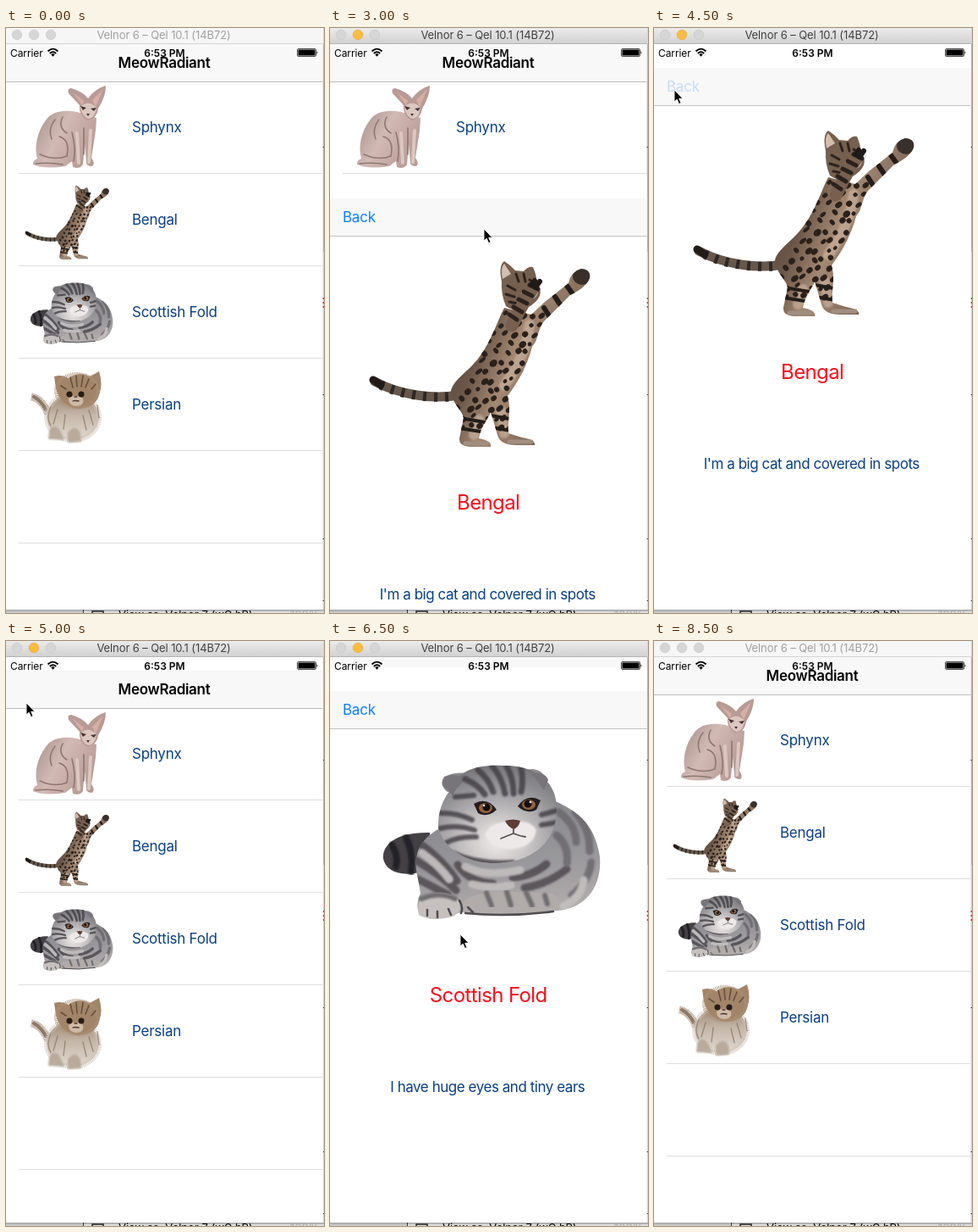
An HTML page for the animation above (8750 ms loop, 376 by 690 pixels).

```html
<!DOCTYPE html>
<html lang="en">
<head>
<meta charset="utf-8">
<title>Cat browser</title>
<style>
html, body { margin: 0; height: 100%; overflow: hidden; background: #fff; }
svg { display: block; width: 376px; height: 690px; font-family: Inter, Roboto, sans-serif; }
.row { font-size: 17px; letter-spacing: -.25px; fill: #0b4080; }
.about { letter-spacing: -.46px; }
.mid { text-anchor: middle; }
.head { font-size: 17px; font-weight: 600; letter-spacing: -.3px; }
.line { fill: none; stroke-linecap: round; stroke-linejoin: round; }
.butt { stroke-linecap: butt; }
</style>
</head>
<body>
<svg viewBox="0 0 376 690">
<defs>
  <linearGradient id="chrome" x2="0" y2="1"><stop stop-color="#ebebeb"/><stop offset="1" stop-color="#d2d2d2"/></linearGradient>
  <linearGradient id="shade" x2="0" y2="1"><stop stop-color="#a4a4a4"/><stop offset="1" stop-color="#d4d4d4"/></linearGradient>
  <linearGradient id="tan" x2="1" y2=".5"><stop stop-color="#4c3d33"/><stop offset=".35" stop-color="#6b5748"/><stop offset=".55" stop-color="#a38872"/><stop offset="1" stop-color="#6f5b4d"/></linearGradient>
  <linearGradient id="grey" x1=".3" x2=".5" y2="1"><stop stop-color="#858488"/><stop offset=".55" stop-color="#98979a"/><stop offset="1" stop-color="#b3aeae"/></linearGradient>
  <radialGradient id="face" cy=".78" r=".8"><stop stop-color="#efebea"/><stop offset=".35" stop-color="#c6c3c4"/><stop offset=".7" stop-color="#969598"/><stop offset="1" stop-color="#747377"/></radialGradient>
  <linearGradient id="pink" x2="1" y2=".5"><stop stop-color="#a28d88"/><stop offset=".5" stop-color="#d2bab4"/><stop offset="1" stop-color="#b79c95"/></linearGradient>
  <linearGradient id="cream" x2="0" y2="1"><stop stop-color="#9b8470"/><stop offset=".45" stop-color="#c4b6a8"/><stop offset="1" stop-color="#e2dad1"/></linearGradient>
  <filter id="soft"><feGaussianBlur stdDeviation="1.3"/></filter>
  <clipPath id="screen"><rect y="19" width="374.5" height="667"/></clipPath>
  <clipPath id="coat"><use href="#torso"/></clipPath>
  <clipPath id="fur"><use href="#trunk"/></clipPath>
  <clipPath id="mask"><use href="#skull"/></clipPath>

  <path id="torso" d="M206 176C197 194 191 214 178 232C166 250 146 260 143 274C144 289 156 296 158 306L153 330Q152 339 165 340H190Q192 333 176 330C178 318 186 308 190 299L198 326Q201 338 220 338H242Q244 332 227 329L211 324C209 311 215 297 210 280C223 263 234 242 239 222C247 213 245 202 253 192L284 161Q303 152 307 141Q309 131 297 130Q285 133 282 147L254 169L238 184Z"/>
  <path id="trunk" d="M132 208C104 222 97 242 104 268L107 286C99 304 103 316 128 315C145 314 149 307 160 308C190 313 240 308 270 306C302 303 322 278 319 242C313 202 290 187 262 175Z"/>
  <path id="skull" d="M143 163C150 141 174 133 205 135C237 134 262 149 267 175C272 208 256 236 223 246C181 258 139 243 128 209Q127 182 143 163Z"/>

  <g id="bengal">
    <path class="line" stroke="#66574c" stroke-width="11" d="M151 279C125 284 85 280 53 263"/>
    <path class="line butt" stroke="#2f2722" stroke-width="11" stroke-dasharray="4 9" d="M140 281C112 283 80 277 58 266"/>
    <path class="line" stroke="#211b18" stroke-width="9" d="M51 261L60 267"/>
    <use href="#torso" fill="url(#tan)"/>
    <g clip-path="url(#coat)">
      <path class="line" stroke="#d0b9a6" stroke-width="12" opacity=".6" filter="url(#soft)" d="M236 196Q232 232 206 268M176 308L170 326M202 298L206 324"/>
      <g id="spots" fill="#2b211b"></g>
      <g class="line" stroke="#251d19" stroke-width="6">
        <path d="M253 176L262 190M266 163L276 178M280 150L290 164"/>
        <path stroke-width="4" d="M154 306L183 311M153 318L178 322M190 303L212 307M196 318L214 321"/>
      </g>
      <ellipse cx="298" cy="139" rx="11" ry="10" fill="#3a302b"/>
    </g>
    <path fill="#755f4f" d="M203 145Q199 126 206 121Q214 126 219 132L229 133Q234 127 240 128Q245 139 244 146Q254 158 243 169Q225 186 208 174Q202 160 203 145Z"/>
    <path fill="#d3beb0" d="M204 142Q201 129 206 124L214 136Z"/>
    <path class="line" stroke="#2d231d" stroke-width="3" d="M220 136L223 145M229 136L231 145M210 150L219 155M208 160L218 163M236 143L240 146M212 169L222 171"/>
    <path fill="#cdbaa9" d="M226 157Q238 151 246 158Q243 169 229 167Z"/>
    <path class="line" stroke="#77604f" stroke-width="15" d="M215 197C222 183 228 170 240 153"/>
    <path class="line" stroke="#2c221d" stroke-width="5" d="M212 184L221 190M217 175L227 181M223 166L233 171M229 157L239 162M236 149L246 154"/>
    <path class="line" stroke="#201a18" stroke-width="6" d="M238 149L242 144M243 152L248 145"/>
    <path class="line" stroke="#a08e80" stroke-width="5" d="M160 336H185M212 334H238"/>
  </g>

  <g id="fold">
    <path fill="#444145" d="M118 214C76 213 61 230 63 245C66 259 84 269 116 258Z"/>
    <path class="line" stroke="#232126" stroke-width="8" filter="url(#soft)" d="M73 229Q81 240 78 254M90 220Q99 238 96 260"/>
    <use href="#trunk" fill="url(#grey)"/>
    <g clip-path="url(#fur)"><g class="line" stroke="#48454a" stroke-width="9" filter="url(#soft)" opacity=".8">
      <path d="M103 225Q131 243 150 271M102 247Q130 263 149 282M104 269L139 287M151 252Q165 273 193 274M216 267Q240 265 256 251M230 279Q257 275 280 257"/>
      <path stroke="#68666a" d="M271 190Q291 205 291 225M290 190Q308 210 307 236M268 217Q283 230 280 250M309 249Q306 272 286 288"/>
      <path stroke="#c6c2c2" d="M109 238Q128 252 141 269M160 254Q184 267 225 258M300 270Q298 290 276 301M168 275Q190 281 214 276"/>
    </g></g>
    <path fill="#b1abaa" d="M160 293C184 278 235 286 264 286Q276 298 267 306C226 310 188 314 164 308Q151 304 160 293Z"/>
    <path fill="#c6c0bf" d="M108 291Q128 279 149 290Q160 306 145 313Q119 320 105 311Q102 299 108 291Z"/>
    <path class="line" stroke="#716d70" stroke-width="6" filter="url(#soft)" d="M185 285L191 300M209 284L214 300M232 285L239 300M254 288L257 298M108 292Q129 283 148 292"/>
    <path class="line" stroke="#504c50" stroke-width="2.5" d="M115 305V312M127 307V314M140 304L143 311M163 302L169 308M160 309Q210 314 264 307M153 294Q158 302 155 309"/>
    <path fill="#8f8c8f" d="M139 166Q128 158 135 148Q151 141 167 145L240 139Q257 142 252 155Z"/>
    <use href="#skull" fill="url(#face)"/>
    <path fill="#77747a" d="M134 159Q130 147 146 146L165 147Q151 158 145 170ZM238 143Q255 142 258 152L253 164Z"/>
    <g clip-path="url(#mask)"><g class="line" stroke="#413e43" stroke-width="7" filter="url(#soft)" opacity=".8">
      <path d="M175 140Q188 151 193 166M192 136Q203 148 207 168M209 136Q217 150 217 168M226 138Q229 153 226 166M160 151Q176 158 183 169"/>
      <path stroke-width="6" d="M128 191Q150 190 168 199M130 209Q150 204 171 211M137 226Q152 218 173 219M250 193L268 188M250 205L268 202M148 172L170 170M145 238Q176 252 216 249"/>
    </g></g>
    <path fill="#ece9e8" filter="url(#soft)" d="M216 202Q190 199 183 217Q193 235 219 233Q241 230 244 211Q237 198 216 202Z"/>
    <g id="eyes"><path fill="#221d20" d="M170 180Q186 171 197 187Q186 197 175 191Z"/><ellipse cx="184" cy="185" rx="8" ry="6" fill="#96633a"/><circle cx="185" cy="184" r="4.5" fill="#120e0e"/><circle cx="182" cy="182" r="1.3" fill="#fff"/></g>
    <use href="#eyes" transform="translate(419 -4) scale(-1 1)"/>
    <path fill="#5d3d34" d="M207 200Q217 197 225 200Q223 208 217 210Q210 207 207 200Z"/>
    <path class="line" stroke="#5a5154" stroke-width="1.8" d="M217 210V215Q209 218 202 221M217 215Q224 218 231 219"/>
  </g>

  <g id="sphynx">
    <path fill="url(#pink)" d="M84 99C69 96 54 98 47 109C37 122 33 140 37 154Q31 157 32 161Q45 167 70 163L78 157L79 164Q87 167 91 161L93 137L95 157Q94 163 102 163Q106 160 101 153L106 121L107 106Z"/>
    <path class="line" stroke="#8e7772" stroke-width="1.6" d="M58 108Q49 119 54 131M67 105Q61 117 72 124M40 149Q58 157 72 151Q76 132 63 128M78 123Q83 142 80 157M92 118V149M35 160Q51 158 67 161"/>
    <path class="line" stroke="#dcc7c0" stroke-width="4" d="M84 124L86 159M100 121L98 158"/>
    <path fill="#b89b95" d="M87 91L74 77Q72 71 77 71Q91 75 97 83Q106 71 118 68Q118 81 109 95Q108 106 97 109Q86 104 87 91Z"/>
    <path fill="#d7ada4" d="M79 76L92 86L90 91ZM115 72L106 93L102 85Z"/>
    <path fill="#dcc7be" d="M88 93Q97 84 107 94Q105 107 97 107Q89 103 88 93Z"/>
    <path fill="#403432" d="M88 92L95 94L91 97ZM107 94L100 95L104 98ZM95 101H99L97 104Z"/>
  </g>

  <g id="persian">
    <path class="line butt" stroke="#b8a695" stroke-width="9" stroke-dasharray="1.2 .5" d="M30 435Q42 437 50 455"/>
    <path class="line" stroke="#8d7967" stroke-width="4" d="M33 435Q41 439 47 450"/>
    <ellipse cx="79" cy="459" rx="31" ry="27" fill="url(#cream)" stroke="#cfc4b9" stroke-width="6" stroke-dasharray=".9 1"/>
    <path fill="#b9aa9b" filter="url(#soft)" d="M51 475Q58 463 65 477L69 486L50 485ZM73 477Q83 466 88 478L89 488L73 489Z"/>
    <path class="line" stroke="#867461" stroke-width="1.4" opacity=".7" d="M53 447Q47 460 53 469M61 450L56 467M70 456L68 473M98 451L103 468M91 457L95 474M108 445L110 460"/>
    <path fill="#a28568" d="M59 425L57 411Q66 408 74 413Q87 404 99 411L110 405Q115 420 110 433Q105 449 84 449Q64 446 59 425Z"/>
    <ellipse cx="84" cy="428" rx="25" ry="20" fill="none" stroke="#ab9279" stroke-width="4" stroke-dasharray=".9 1.1"/>
    <path class="line" stroke="#65503e" stroke-width="1.6" d="M76 412L79 424M83 410L84 423M91 410L89 423M98 414L94 424M65 422L71 426M106 420L101 426"/>
    <path fill="#cdbba8" d="M74 437Q82 430 91 437Q93 446 82 446Q74 445 74 437Z"/>
    <circle cx="75" cy="432" r="3.5" fill="#281c16"/><circle cx="89" cy="432" r="3.5" fill="#281c16"/>
    <path class="line" stroke="#4c332a" stroke-width="1.3" d="M81 435H84M79 440Q82 439 86 440"/>
  </g>

  <g id="list">
    <rect y="19" width="375" height="667" fill="#fff"/>
    <rect y="19" width="375" height="44" fill="#f8f8f8"/>
    <path d="M0 63.5H375" stroke="#bdbdbd"/>
    <text class="head mid" x="187" y="47">MeowRadiant</text>
    <path stroke="#dedee0" d="M15 171.5H375M15 280.5H375M15 389.5H375M15 498.5H375M15 607.5H375"/>
    <use href="#sphynx"/>
    <use href="#bengal" transform="translate(5 137) scale(.38 .4)"/>
    <use href="#fold" transform="translate(5 246.6) scale(.38 .4)"/>
    <use href="#persian"/>
    <g class="row">
      <text x="149" y="123">Sphynx</text><text x="149" y="232">Bengal</text>
      <text x="149" y="341">Scottish Fold</text><text x="149" y="450">Persian</text>
    </g>
  </g>
</defs>

<!-- desktop behind the window -->
<rect width="376" height="690" fill="#d6d6d6"/>
<path stroke="#55595f" d="M376 19V264" opacity=".5"/>
<path stroke="#333" d="M374 140.5H376M374 432.5H376M374 602.5H376M374 675.5H376"/>
<path stroke="#c0392b" stroke-width="2" d="M374 319H376M374 324H376M374 329H376"/>
<rect y="686" width="376" height="4" fill="url(#shade)"/>
<rect x="92" y="688" width="284" height="2" fill="#dcdcdc"/>
<path stroke="#333" d="M91.5 686V690"/>
<path fill="none" stroke="#222" stroke-width="1.5" d="M102 691V688H115V691"/>
<text x="133" y="697" font-size="13">View as: Velnor 7 (wC hR)</text>
<text x="336" y="697" font-size="13" fill="#aaa">100%</text>

<g clip-path="url(#screen)">
  <use href="#list"/>
  <g id="detail">
    <rect y="19" width="375" height="667" fill="#fff"/>
    <rect y="47" width="375" height="44" fill="#f8f8f8"/>
    <path d="M0 91.5H375" stroke="#c4c4c4"/>
    <text id="back" x="15" y="75" font-size="17" letter-spacing="-.25" fill="#147efb">Back</text>
    <use id="photo" href="#bengal"/>
    <text id="name" class="mid" x="187.2" y="413.5" font-size="24" letter-spacing="-.6" fill="#fc0d1b"></text>
    <text id="about" class="row about mid" x="186.3" y="520"></text>
  </g>
  <use id="cover" href="#list"/>
</g>

<!-- status bar -->
<g font-size="12">
  <text x="5" y="33.5" letter-spacing="-.1">Carrier</text>
  <text class="mid" x="187.5" y="33.5" font-weight="600">6:53 PM</text>
  <path class="line butt" stroke="#000" stroke-width="1.8" d="M49.5 27.5Q55.5 21.8 61.5 27.5M51.8 30Q55.5 26.5 59.2 30"/>
  <path d="M53.3 31.2Q55.5 29.4 57.7 31.2L55.5 33.7Z"/>
  <rect x="344.5" y="24.5" width="22" height="9" rx="1.5" fill="none" stroke="#000" stroke-width=".7"/>
  <rect x="345.5" y="25.5" width="20" height="7" rx=".6"/>
  <path d="M367.5 27.5Q369.5 29 367.5 30.5Z"/>
</g>

<!-- title bar -->
<rect id="bar" width="375" height="18"/>
<path id="edge" d="M0 18.5H375"/>
<g stroke="#c4c4c4" stroke-width=".6" fill="#d6d6d6">
  <circle cx="13" cy="8" r="5.8"/><circle id="dot" cx="33" cy="8" r="5.8"/><circle cx="53" cy="8" r="5.8"/>
</g>
<text id="title" class="mid" x="186.5" y="12.8" font-size="13" letter-spacing="-.1">Velnor 6 – Qel 10.1 (14B72)</text>
<path id="cursor" d="M0 0V14L3.2 11.2L5.6 16.6L8 15.6L5.7 10.3H10Z" stroke="#fff" stroke-width=".9"/>
</svg>
<script>
const LOOP = 8750, TICK = 250, HEIGHT = 667;
const $ = id => document.getElementById(id);
const set = (id, attrs) => { for (const k in attrs) $(id).setAttribute(k, attrs[k]); };
const moveTo = (id, x, y) => set(id, { transform: `translate(${x} ${y})` });
const show = (id, on) => { $(id).style.display = on ? '' : 'none'; };

const visits = [
  { open: 2800, press: 4500, close: 4600, photo: '#bengal', name: 'Bengal', about: "I'm a big cat and covered in spots" },
  { open: 6075, press: 7400, close: 7478, photo: '#fold', name: 'Scottish Fold', about: 'I have huge eyes and tiny ears' }
];

// time, x, y of the pointer
const path = [
  [1250, 306, 3], [1500, 300, 205], [1750, 262, 430], [2000, 155, 300], [2250, 182, 237],
  [3500, 182, 237], [4000, 60, 115], [4250, 24, 73], [5250, 24, 73],
  [5500, 60, 150], [6000, 154, 346], [6500, 154, 346], [7250, 24, 77], [7500, 24, 77],
  [7750, 40, 60], [8250, 260, 2]
];

function pointer(t) {
  const i = path.findIndex(p => p[0] >= t);
  if (i < 0 || t < path[0][0]) return null;
  const b = path[i], a = path[Math.max(i - 1, 0)];
  const k = (t - a[0]) / (b[0] - a[0] || 1);
  return [a[1] + (b[1] - a[1]) * k, a[2] + (b[2] - a[2]) * k];
}

// distance left for a sheet on a critically damped spring
function slide(ms) {
  const s = Math.max(ms, 0) * .014;
  return Math.round(HEIGHT * (1 + s) * Math.exp(-s));
}

function addSpots() {
  let seed = 7, out = '';
  const rnd = () => (seed = seed * 16807 % 2147483647) / 2147483647;
  for (let row = 0; row < 13; row++)
    for (let col = 0; col < 7; col++) {
      const y = 182 + row * 11 + rnd() * 5;
      const x = 202 - row * 5.2 + col * 12 + rnd() * 6;
      out += `<ellipse cx="${x}" cy="${y}" rx="${2.5 + rnd() * 2.5}" ry="${2 + rnd() * 2}" transform="rotate(-40 ${x} ${y})"/>`;
    }
  $('spots').innerHTML = out;
}

function draw(t) {
  const active = t >= 2500 && t < 8250;
  set('bar', { fill: active ? 'url(#chrome)' : '#f6f6f6' });
  set('edge', { stroke: active ? '#b4b4b4' : '#d4d4d4' });
  set('dot', { fill: active ? '#fdbc40' : '#d6d6d6', stroke: active ? '#e0a43a' : '#c4c4c4' });
  set('title', { fill: active ? '#404040' : '#a0a0a0' });

  const v = visits.find(v => t >= v.open && t < v.close + 700);
  show('detail', v);
  show('cover', v);
  if (v) {
    set('photo', { href: v.photo });
    $('name').textContent = v.name;
    $('about').textContent = v.about;
    set('back', { opacity: t >= v.press ? .22 : 1 });
    moveTo('detail', 0, slide(t - v.open));
    moveTo('cover', 0, slide(t - v.close));
  }

  const p = pointer(t);
  show('cursor', p);
  if (p) moveTo('cursor', ...p);
}

function frame() {
  draw(Math.floor(performance.now() % LOOP / TICK) * TICK);
  requestAnimationFrame(frame);
}
addSpots();
frame();
</script>
</body>
</html>
```
